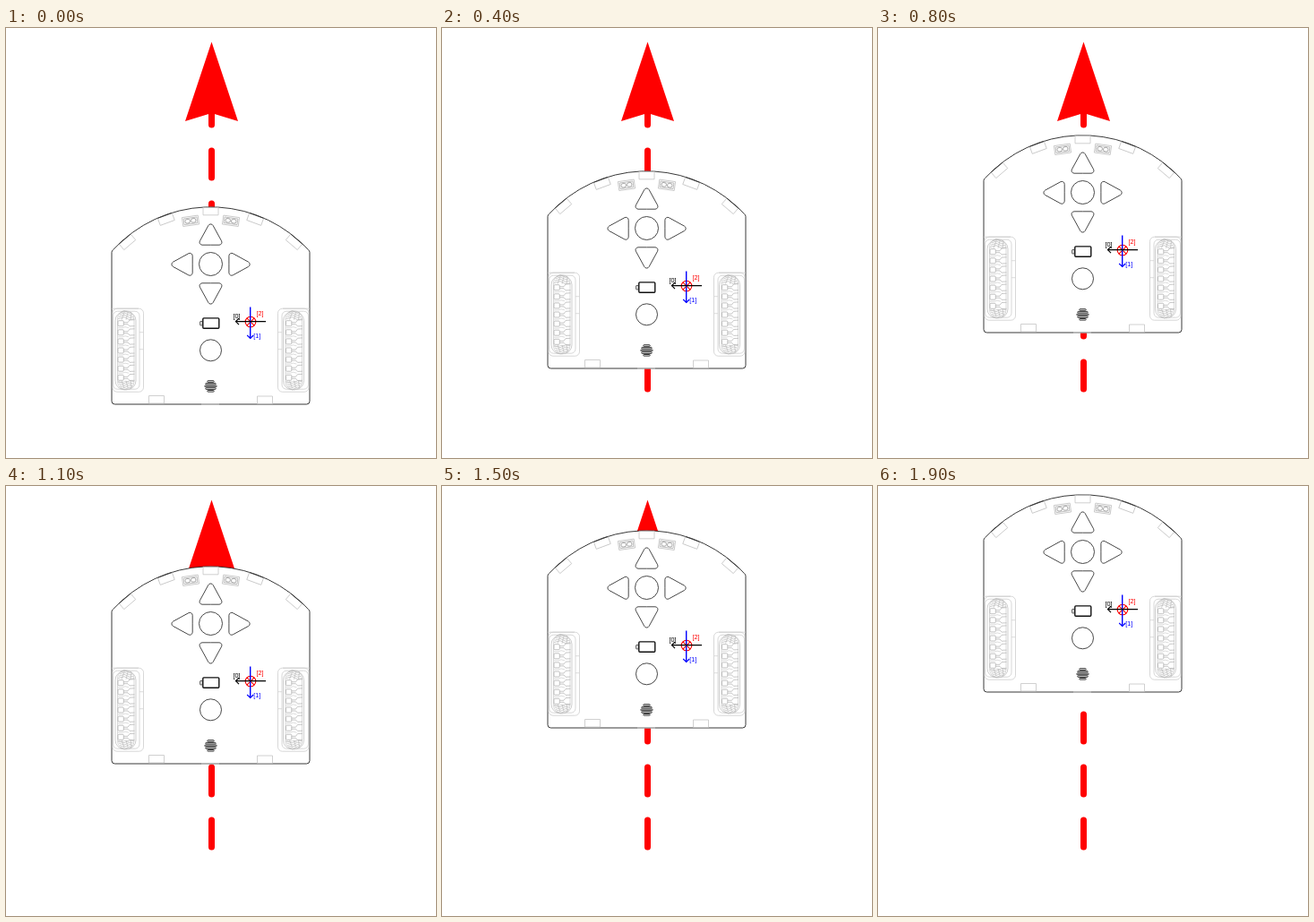
An HTML page with a canvas for the animation above (2000 ms loop, 480 px wide and 480 px high).

```html
<!DOCTYPE html>
<html lang="en">
<head>
<meta charset="utf-8">
<title>Robot driving forward</title>
<style>
html, body { margin: 0; width: 100%; height: 100%; overflow: hidden; background: #fff; }
canvas { display: block; }
</style>
</head>
<body>
<canvas id="stage" width="480" height="480"></canvas>
<script>
const ctx = document.getElementById('stage').getContext('2d');
const LOOP = 2000, STEP = 100, STEP_PX = 10;
const CX = 228.5, ARC_Y = 347.8, ARC_R = 148;
const GREY = '#c4c4c4';

function stroke(color, width = 1) {
  ctx.strokeStyle = color;
  ctx.lineWidth = width;
  ctx.stroke();
}

function line(points, color, width) {
  ctx.beginPath();
  points.forEach(([x, y], i) => i ? ctx.lineTo(x, y) : ctx.moveTo(x, y));
  stroke(color, width);
}

function box(x, y, w, h, r, color, width) {
  ctx.beginPath();
  ctx.roundRect(x, y, w, h, r);
  stroke(color, width);
}

function circle(x, y, r, color, width) {
  ctx.beginPath();
  ctx.arc(x, y, r, 0, Math.PI * 2);
  stroke(color, width);
}

function placed(x, y, angle, draw) {
  ctx.save();
  ctx.translate(x, y);
  ctx.rotate(angle * Math.PI / 180);
  draw();
  ctx.restore();
}

function drawPath() {
  ctx.lineCap = 'round';
  for (let y = 403; y > 100; y -= 59) {
    line([[229.5, y], [229.5, y - 30]], '#f00', 7);
  }
  ctx.lineCap = 'butt';
  ctx.fillStyle = '#f00';
  ctx.beginPath();
  ctx.moveTo(229.5, 15.5);
  ctx.lineTo(259, 104);
  ctx.lineTo(229.5, 95);
  ctx.lineTo(200, 104);
  ctx.fill();
}

function drawBody() {
  const left = 118, right = 339, bottom = 420;
  const a = Math.asin(109 / ARC_R);
  ctx.beginPath();
  ctx.arc(CX, ARC_Y, ARC_R, -Math.PI / 2 - a, -Math.PI / 2 + a);
  ctx.quadraticCurveTo(right, 248.8, right, 250.5);
  ctx.arcTo(right, bottom, CX, bottom, 3.5);
  ctx.arcTo(left, bottom, left, 300, 3.5);
  ctx.lineTo(left, 250.5);
  ctx.quadraticCurveTo(left, 248.8, CX - 109, 247.7);
  ctx.closePath();
  ctx.fillStyle = '#fff';
  ctx.fill();
  stroke('#222', 0.9);
  line([[218, 420], [238, 420]], '#ccc', 1.1);
}

function drawSensors() {
  for (const angle of [-40.5, -20.3, 0, 20.3, 40.5]) {
    placed(CX, ARC_Y, angle, () => {
      box(-8.5, -147.5, 17, 8.5, 0, GREY, 0.8);
      if (angle) line([[-8.5, -147.6], [8.5, -147.6]], '#222', 0.8);
    });
  }
  box(159.5, 410.5, 17, 8.5, 0, GREY, 0.8);
  box(280.5, 411, 17, 8.5, 0, GREY, 0.8);
}

function drawLed() {
  box(-9, -5, 18, 10, 0, '#b8b8b8', 0.7);
  box(-7.5, -3.3, 15, 6.6, 0, '#aaa', 0.7);
  for (const x of [-3.3, 3.3]) box(x - 2.6, -2.2, 5.2, 4.4, 1.6, '#888', 0.7);
}

// Frame around a wheel; side is 1 for the left wheel and -1 for the right.
function drawWheelFrame(side) {
  const tone = '#cdcdcd';
  ctx.scale(side, 1);
  line([[-18, -46.5], [12, -46.5]], tone, 0.8);
  box(-17, -46.5, 34.5, 93, 5, tone, 0.8);
  box(-16.5, -43.5, 29.5, 87, 5, tone, 0.8);
  line([[13, -20], [17.5, -20]], tone, 0.7);
  line([[13, -1], [17.5, -1]], tone, 0.7);
}

function drawRollers() {
  box(-12, -43, 23, 87, 10, '#bbb', 0.7);
  box(-9.5, -44, 18.5, 88, 9, '#c8c8c8', 0.7);
  // Rollers: a square hub, a neck and a flared outer end.
  for (let i = 0; i < 7; i++) {
    const y = -30 + i * 10.1;
    box(-9, y - 3, 6.3, 6, 1, '#aaa', 0.7);
    line([[-2.7, y - 1], [2, y - 1], [4, y - 3.7], [9.5, y - 4]], '#b0b0b0', 0.7);
    line([[-2.7, y + 1], [2, y + 1], [4, y + 3.2], [9.5, y + 3]], '#b0b0b0', 0.7);
    line([[-9, y + 5], [-4, y + 5], [-1, y + 4], [3, y + 5]], '#c4c4c4', 0.6);
  }
  for (const end of [-1, 1]) {
    for (let i = 0; i < 4; i++) {
      const y = end * (35 + i * 2.4);
      line([[-9 + i, y], [-2, y + end * 2], [4, y - end], [9 - i, y]], '#b8b8b8', 0.7);
    }
    for (const x of [-5, 0, 5]) {
      line([[x, end * 34], [x * 0.8 + 2, end * 42]], '#bbb', 0.7);
    }
  }
}

function drawArrowButton() {
  ctx.beginPath();
  ctx.moveTo(0, 11.5);
  ctx.arcTo(14.5, 11.5, 0, -15, 3);
  ctx.arcTo(0, -15, -14.5, 11.5, 3);
  ctx.arcTo(-14.5, 11.5, 0, 11.5, 3);
  ctx.closePath();
  stroke('#333', 0.9);
}

function drawControls() {
  placed(CX, 230.7, 0, drawArrowButton);
  placed(260.4, 263.8, 90, drawArrowButton);
  placed(CX, 296.3, 180, drawArrowButton);
  placed(196.7, 263.8, -90, drawArrowButton);
  circle(CX, 263.5, 13, '#333', 0.9);
  circle(CX, 359.8, 12, '#333', 0.9);

  box(219.8, 323.9, 18, 11.3, 1, '#111', 1.4);
  box(216.7, 327.5, 2.5, 4.4, 0.5, '#222', 0.8);

  const widths = [7.5, 11.5, 13.5, 11.5, 7.5];
  widths.forEach((w, i) => box(CX - w / 2, 393.7 + i * 2.7, w, 1.6, 0.8, '#222', 0.9));
}

function label(text, x, y, color) {
  ctx.fillStyle = color;
  ctx.font = '7.2px "Liberation Sans", Arial, sans-serif';
  ctx.fillText(text, x, y);
}

function drawAxes() {
  const x = 272.7, y = 327.6;
  circle(x + 0.3, y + 0.4, 5.8, '#f00', 1.1);
  line([[x - 3.8, y - 3.7], [x + 4.4, y + 4.5]], '#f00', 1.1);
  line([[x + 4.4, y - 3.7], [x - 3.8, y + 4.5]], '#f00', 1.1);
  line([[x, 311.5], [x, 346.5]], '#00f', 1.4);
  line([[x - 3.5, 343], [x, 346.5], [x + 3.5, 343]], '#00f', 1.2);
  line([[290, y], [256.5, y]], '#000', 1.4);
  line([[260, y - 3.5], [256.5, y], [260, y + 3.5]], '#000', 1.2);
  label('[0]', 253.4, 323.8, '#000');
  label('[1]', 276.2, 345.8, '#00f');
  label('[2]', 279.4, 320.6, '#f00');
}

function drawRobot() {
  drawBody();
  drawSensors();
  placed(206, 215.3, -8, drawLed);
  placed(251, 215.3, 8, drawLed);
  placed(136, 359.7, 0, () => drawWheelFrame(1));
  placed(321, 359.7, 0, () => drawWheelFrame(-1));
  placed(134, 359.7, 0, drawRollers);
  placed(321.5, 359.7, 0, drawRollers);
  drawControls();
  drawAxes();
}

const start = performance.now();

function frame() {
  const t = Math.max(0, performance.now() - start) % LOOP;
  ctx.fillStyle = '#fff';
  ctx.fillRect(0, 0, 480, 480);
  drawPath();
  ctx.save();
  ctx.translate(0, -STEP_PX * Math.floor(t / STEP));
  drawRobot();
  ctx.restore();
  requestAnimationFrame(frame);
}
frame();
</script>
</body>
</html>
```
